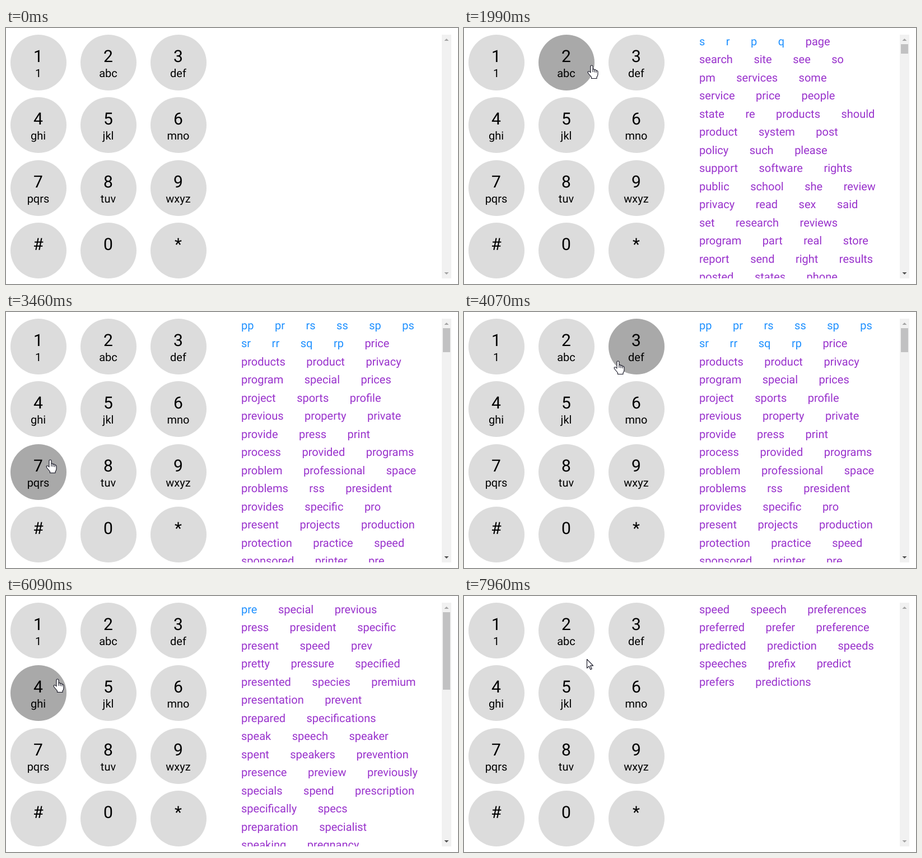
An HTML page that plays this animation: 807x459 px, repeating every 8 s.

```html
<!DOCTYPE html>
<html lang="en">
<head>
<meta charset="utf-8">
<title>Keypad word finder</title>
<style>
  html, body { margin: 0; width: 100%; height: 100%; overflow: hidden; background: #fff; }
  svg { display: block; }
  text { font: 20px Roboto, sans-serif; text-rendering: geometricPrecision; }
  .key { text-anchor: middle; }
  .key .digit { font-size: 30px; }
  .key circle { fill: #dcdcdc; }
  .key.hover circle { fill: #a9a9a9; }
  .words { fill: darkorchid; }
  .exact { fill: dodgerblue; }
  .cursor path { fill: #fff; stroke: #111120; stroke-width: 1.1; stroke-linejoin: round; }
</style>
</head>
<body>
<svg width="807" height="459" viewBox="0 0 807 459">
  <g id="keys"></g>
  <svg x="400" y="12" width="378" height="437" viewBox="400 12 378 437" id="lists"></svg>
  <rect x="778" y="12" width="17" height="437" fill="#f1f1f1"/>
  <rect id="thumb" x="780" y="29" width="13" fill="#c1c1c2"/>
  <path d="M782.5 23h8l-4-4z" fill="#a3a3a3"/>
  <path id="down" d="M782.5 438h8l-4 4z"/>
  <g id="cursor" class="cursor">
    <path id="arrow" d="M.5 .5V16.3L4.2 12.8 6.8 18.8 9.2 17.8 6.6 11.9H11.6Z"/>
    <g id="hand">
      <path d="M-2 2Q-2 0 0 0T2 2V7Q4 6 5 8 7 7 8 9 11 9 11 12V16Q11 19 9 21V23.5H-.5V21L-5.5 15Q-8 12-6 11-4 10-2 13Z"/>
      <path d="M2 7v5M5 8v4.5M8 9v4"/>
    </g>
  </g>
</svg>
<script>
const DURATION = 8000;
const HOVER_RADIUS = 55;
const WORD_GAP = 37.5;
const ROW_HEIGHT = 32.5;
const $ = id => document.getElementById(id);

const labels = ['1 1', '2 abc', '3 def', '4 ghi', '5 jkl', '6 mno',
  '7 pqrs', '8 tuv', '9 wxyz', '#', '0', '*'];

// Each further key press brings up the next list.
const lists = [
  { at: 0, thumb: 0, text: '' },
  { at: 1150, thumb: 17, text: `s r p q page
search site see so
pm services some
service price people
state re products should
product system post
policy such please
support software rights
public school she review
privacy read sex said
set research reviews
program part real store
report send right results
posted states phone` },
  { at: 3460, thumb: 43, text: `pp pr rs ss sp ps
sr rr sq rp price
products product privacy
program special prices
project sports profile
previous property private
provide press print
process provided programs
problem professional space
problems rss president
provides specific pro
present projects production
protection practice speed
sponsored printer pre` },
  { at: 4380, thumb: 139, text: `pre special previous
press president specific
present speed prev
pretty pressure specified
presented species premium
presentation prevent
prepared specifications
speak speech speaker
spent speakers prevention
presence preview previously
specials spend prescription
specifically specs
preparation specialist
speaking pregnancy` },
  { at: 7110, thumb: 0, text: `speed speech preferences
preferred prefer preference
predicted prediction speeds
speeches prefix predict
prefers predictions` }
];

// Pointer stops: arrival time, x, y, rest before moving on
const stops = [
  [70, 666, 433, 0],
  [610, 70, 269, 540],
  [1850, 228, 67, 250],
  [2530, 226, 121, 0],
  [3300, 79, 265, 240],
  [4230, 305, 60, 150],
  [4620, 230, 89, 0],
  [5080, 118, 163, 90],
  [5460, 170, 85, 170],
  [5940, 92, 149, 180],
  [6710, 306, 44, 170],
  [6950, 312, 44, 180],
  [7960, 219, 113, 0]
];

const append = (parent, markup) => {
  parent.insertAdjacentHTML('beforeend', markup);
  return parent.lastElementChild;
};

const keys = labels.map((label, i) => {
  const x = 58 + 125 * (i % 3), y = 62 + Math.floor(112.5 * Math.floor(i / 3));
  const [digit, letters = ''] = label.split(' ');
  const node = append($('keys'), `<g class="key">
    <circle cx="${x}" cy="${y}" r="50"/>
    <text class="digit" x="${x - .5}" y="${y - 1}">${digit}</text>
    <text x="${x - .5}" y="${y + 26}">${letters}</text></g>`);
  return { x, y, node };
});

// Words as long as the number of presses are exact matches.
lists.forEach((list, presses) => {
  const rows = list.text.split('\n').map((row, r) => {
    const words = row.split(' ').map((word, i) =>
      `<tspan dx="${i && WORD_GAP}" class="${r < 2 && word.length === presses ? 'exact' : ''}">${word}</tspan>`);
    return `<text x="420" y="${Math.floor(31 + ROW_HEIGHT * r)}">${words.join('')}</text>`;
  });
  list.node = append($('lists'), `<g class="words">${rows.join('')}</g>`);
});

const show = (node, on) => node.setAttribute('display', on ? 'inline' : 'none');

function pointerAt(t) {
  const i = stops.findLastIndex(stop => stop[0] <= t);
  if (i < 0) return null;
  const [arrived, x, y, rest] = stops[i];
  const [nextTime, nextX, nextY] = stops[i + 1] || [DURATION, x, y];
  const leave = arrived + rest;
  const u = Math.max(0, (t - leave) / (nextTime - leave));
  const k = u * u * (3 - 2 * u);
  return [x + (nextX - x) * k, y + (nextY - y) * k].map(Math.round);
}

function draw(t) {
  const current = lists.findLast(list => list.at <= t);
  lists.forEach(list => show(list.node, list === current));
  $('thumb').setAttribute('height', current.thumb);
  $('down').setAttribute('fill', current.thumb ? '#505050' : '#a3a3a3');

  const pointer = pointerAt(t);
  const hovered = pointer && keys.find(({ x, y }) =>
    Math.hypot(pointer[0] - x, pointer[1] - y) < HOVER_RADIUS);
  keys.forEach(key => key.node.classList.toggle('hover', key === hovered));
  show($('cursor'), pointer);
  show($('hand'), hovered);
  show($('arrow'), !hovered);
  if (pointer) $('cursor').setAttribute('transform', `translate(${pointer})`);
}

function tick() {
  draw(performance.now() % DURATION);
  requestAnimationFrame(tick);
}
tick();
</script>
</body>
</html>
```
